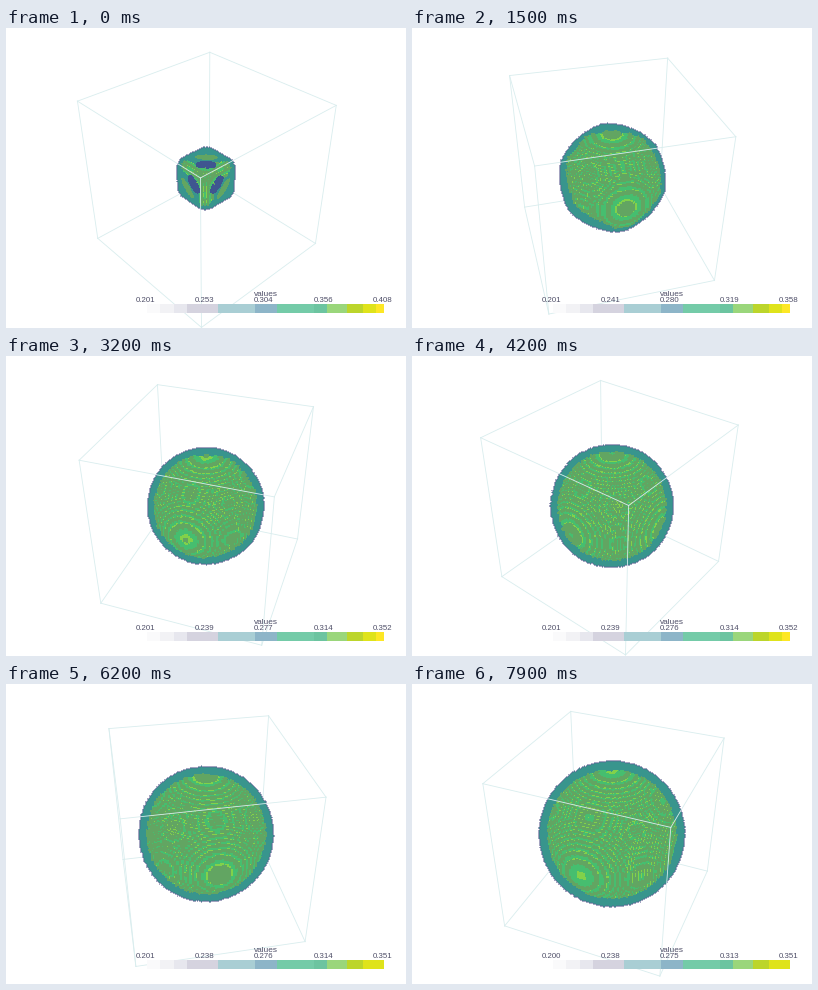
Recreate the animation shown at these times as a matplotlib script. Size 400 by 300 pixels, loop 8000 ms.

```python
import numpy as np
import matplotlib.pyplot as plt
from itertools import combinations, product
from matplotlib.animation import FuncAnimation
from matplotlib.patches import Rectangle

W, H, FRAMES, STEP_MS = 400, 300, 80, 100
DIST = np.sqrt(3) / np.sin(np.radians(15))   # camera distance, box half-size 1
FOCAL = H / 2 / np.tan(np.radians(15))
CELL = 0.025
CELLS = 40                                   # per half axis

EDGE = "#d9edee"
INK = "#4f4f68"
OLIVE, GREEN, LIME, TEAL, NAVY, STEEL, LILAC = (
    [int(c[i:i + 2], 16) for i in (0, 2, 4)]
    for c in ("62a562", "46be6f", "82d14a", "38958d", "3f5690", "42838f", "a3a3c0"))

BANDS = [(141, "#fafafb"), (154, "#f2f2f5"), (168, "#e7e7ee"), (181, "#d5d3df"),
         (212, "#a9ced4"), (249, "#8db5c8"), (271, "#74cba8"), (308, "#6cc4a0"),
         (321, "#9ad67b"), (341, "#bcd52b"), (357, "#dfe31b"), (370, "#fde725"),
         (378, None)]

# One octant of cell centres; the body is symmetric in all three planes.
axis = (np.arange(CELLS) + 0.5) * CELL
X, Y, Z = np.meshgrid(axis, axis, axis, indexing="ij")
ROUND = np.sqrt(X**2 + Y**2 + Z**2)
CUBIC = (X**4 + Y**4 + Z**4) ** 0.25
FACETED = np.maximum(np.maximum(np.maximum(X, Y), Z), (X + Y + Z) / np.sqrt(3))

CORNERS = np.array(list(product((-1, 1), repeat=3)), float)
EDGES = [(a, b) for a, b in combinations(range(8), 2)
         if np.abs(CORNERS[a] - CORNERS[b]).sum() == 2]


def camera(n):
    """Right, up and toward-viewer vectors."""
    psi = np.radians(45 - 2 * max(n, 1))
    c, s = np.cos(psi), np.sin(psi)
    lo, hi = np.sqrt(1 / 3), np.sqrt(2 / 3)
    return np.array([[s, -c, 0], [-lo * c, -lo * s, hi], [hi * c, hi * s, lo]])


def body(n):
    """Shape function, its radius, and how cubic it still is."""
    cube = np.exp(-n / 3)
    facet = (1 - cube) * np.exp(-n / 12)
    shape = (1 - cube - facet) * ROUND + cube * CUBIC + facet * FACETED
    return shape, 0.57 + 0.0037 * n - 0.275 * np.exp(-n / 4), cube


def cell_of(p):
    i = np.minimum((np.abs(p) / CELL).astype(int), CELLS - 1)
    return i[:, 0], i[:, 1], i[:, 2]


def erode(mask):
    out = mask.copy()
    for ax_, step in product((0, 1), (-1, 1)):
        out &= np.roll(mask, step, ax_)
    return out


def ellipse(u, v, ru, rv):
    return (u / ru)**2 + (v / rv)**2 < 1


def render(n):
    cam = camera(n)
    shape, radius, cube = body(n)
    solid = shape < radius
    bound = ROUND[solid].max() + CELL

    py, px = np.mgrid[0:H, 0:W]
    offs = np.stack([px.ravel() + 0.5 - W / 2, H / 2 - py.ravel() - 0.5,
                     np.full(W * H, -FOCAL)], 1)
    rays = offs / np.linalg.norm(offs, axis=1, keepdims=True)
    b = -DIST * rays[:, 2]
    disc = b**2 - DIST**2 + bound**2
    ids = np.flatnonzero(disc > 0)
    rays = rays[ids] @ cam
    half = np.sqrt(disc[ids])
    t, end = b[ids] - half, b[ids] + half
    eye = DIST * cam[2]

    # March until each ray meets a filled cell.
    live = np.arange(len(ids))
    found = []
    while live.size:
        p = eye + t[live, None] * rays[live]
        inside = solid[cell_of(p)]
        found.append(live[inside])
        live = live[~inside]
        t[live] += CELL * 0.4
        live = live[t[live] < end[live]]
    hit = np.concatenate(found)

    ray = rays[hit]
    p = eye + t[hit, None] * ray
    cell = cell_of(p)
    depth = (radius - shape[cell]) / CELL
    normal = np.stack([g[cell] for g in np.gradient(shape)], 1) * np.sign(p)
    normal /= np.linalg.norm(normal, axis=1, keepdims=True)
    facing = -(normal * ray).sum(1)

    color = np.empty((len(hit), 3), np.uint8)
    color[:] = OLIVE
    color[depth > 0.5] = GREEN
    color[depth > 0.9] = LIME
    color[facing < 0.45 + 0.2 * cube] = TEAL
    if cube > 0.5:
        # Patches of the core showing through each visible face.
        q = np.sort(p + 0.17 * ray, axis=1)
        across, along = q[:, 1] - q[:, 0], q[:, 0] + q[:, 1]
        color[ellipse(across, along + 0.2, 0.2, 0.08)] = OLIVE
        color[ellipse(across, along, 0.17, 0.088)] = NAVY

    img = np.zeros((H * W, 4), np.uint8)
    img[ids[hit], :3] = color
    img[ids[hit], 3] = 255
    img = img.reshape(H, W, 4)

    mask = img[..., 3] > 0
    inner = erode(mask)
    img[inner & ~erode(inner), :3] = STEEL
    img[mask & ~inner, :3] = LILAC
    return img


def limits(n):
    low = np.interp(n, [0, 15, 32, 42, 54, 69, 79],
                    [.2008, .2014, .2011, .2010, .2007, .2011, .1999])
    return low, 0.3518 - 0.00001 * n + 0.0562 * np.exp(-n / 7)


fig = plt.figure(figsize=(W / 100, H / 100), dpi=100, facecolor="white")
ax = fig.add_axes([0, 0, 1, 1])
ax.set_xlim(0, W)
ax.set_ylim(H, 0)
ax.axis("off")

picture = ax.imshow(np.zeros((H, W, 4), np.uint8), extent=(0, W, H, 0),
                    interpolation="nearest", aspect="auto", zorder=2)
wires = [ax.plot([], [], color=EDGE, lw=0.6)[0] for _ in EDGES]

for (x0, col), (x1, _) in zip(BANDS, BANDS[1:]):
    tip = ax.add_patch(Rectangle((x0, 276), x1 - x0, 9, fc=col, lw=0, zorder=5,
                                 antialiased=False))


def label(x, y, text, px):
    return ax.text(x, y, text, size=px * 0.72, color=INK, ha="center",
                   va="baseline", family="Liberation Sans", zorder=6)


label(260, 268, "values", 8.3)
ticks = [label(x, 274, "", 7.9) for x in np.linspace(139, 377, 5)]


def update(n):
    picture.set_data(render(n))
    pts = CORNERS @ camera(n).T
    scale = FOCAL / (DIST - pts[:, 2])
    sx, sy = W / 2 + pts[:, 0] * scale, H / 2 - pts[:, 1] * scale
    for wire, (a, b) in zip(wires, EDGES):
        wire.set_data([sx[a], sx[b]], [sy[a], sy[b]])
        wire.set_zorder(3 if pts[a, 2] + pts[b, 2] > 0 else 1)
    for tick, v in zip(ticks, np.linspace(*limits(n), 5)):
        tick.set_text(f"{v:.3f}")
    tip.set_facecolor("#fde725" if n < 50 else "#dfe31b")
    return [picture, *wires, *ticks, tip]


anim = FuncAnimation(fig, update, frames=FRAMES, interval=STEP_MS,
                     repeat=True, repeat_delay=0, blit=False)
plt.show()
```
